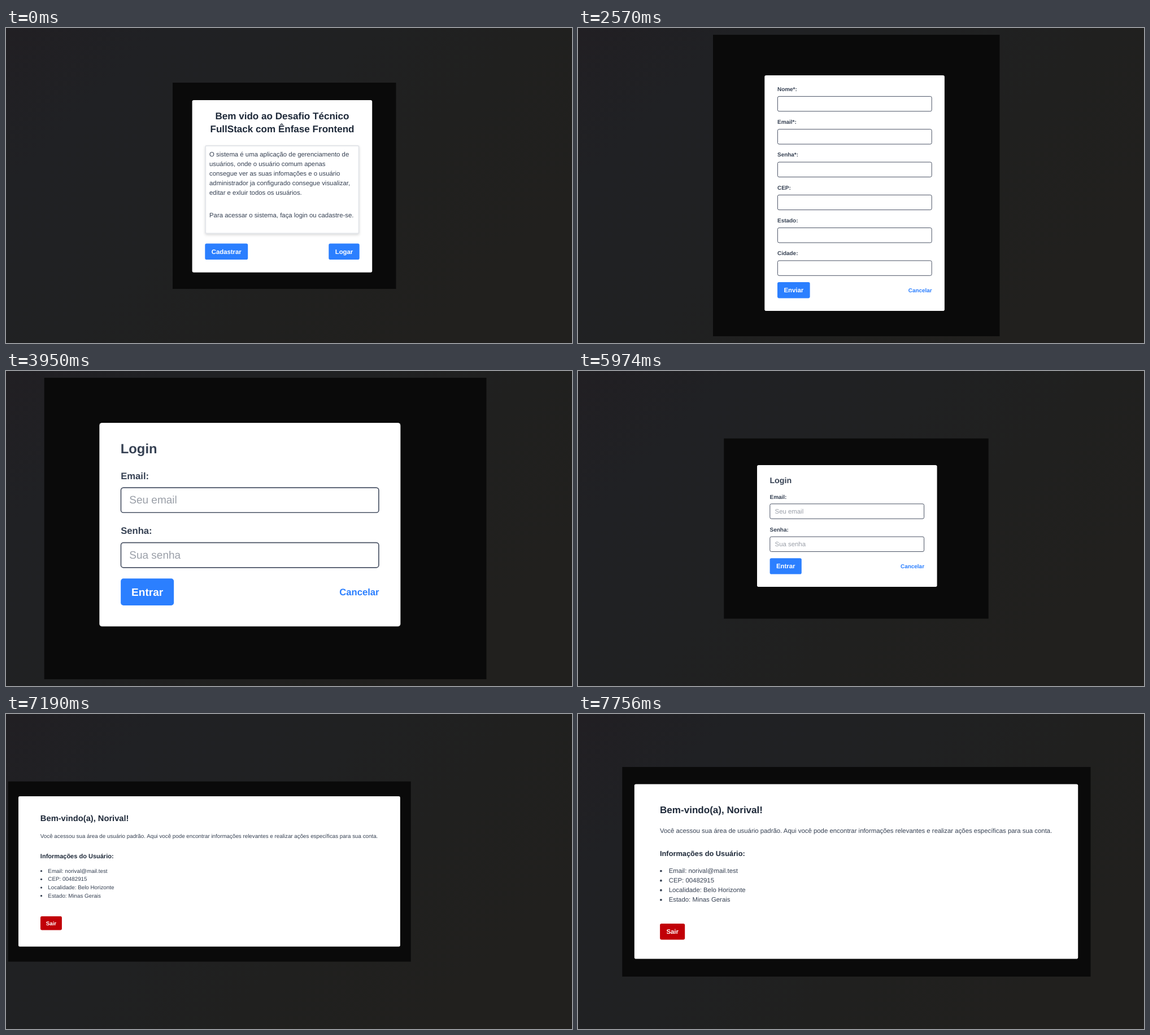
Recreate the animation shown at these times as an HTML page. Size 1002 by 559 pixels, loop 8 s.

```html
<!DOCTYPE html>
<html lang="pt-BR">
<head>
<meta charset="utf-8">
<title>Cadastro e login</title>
<style>
  html, body { margin: 0; width: 100%; height: 100%; overflow: hidden; background: #202021; }
  svg { display: block; width: 1002px; height: 559px; }
  text { font-family: "Liberation Sans", Arial, sans-serif; fill: #364153; text-rendering: geometricPrecision; white-space: pre; }
  .bold { font-weight: 700; }
  .dark { fill: #1e2939; }
  .link { fill: #2b7fff; }
  .hint { fill: #9a9fa8; }
  .light { fill: #fff; }
  .field { fill: #fff; stroke: #4a5365; }
  .panel { fill: #fff; stroke: #e4e6ea; stroke-width: 2; filter: drop-shadow(0 2px 2px rgba(0, 0, 0, .14)); }
</style>
</head>
<body>
<svg id="stage" viewBox="0 0 1002 559">
  <defs>
    <linearGradient id="wall" x1="0" y1="0" x2="1" y2=".55">
      <stop offset="0" stop-color="#211f23"/>
      <stop offset=".22" stop-color="#202124"/>
      <stop offset=".5" stop-color="#202122"/>
      <stop offset=".72" stop-color="#20201f"/>
      <stop offset="1" stop-color="#21201e"/>
    </linearGradient>
  </defs>
  <rect width="1002" height="559" fill="url(#wall)"/>
  <rect id="backdrop" fill="#0a0a0a"/>
</svg>
<script>
const stage = document.getElementById('stage');
const backdrop = document.getElementById('backdrop');

// Font sizes: 16, 14, 18, 20 and 24 px pages shown at 71 %
const ZOOM = 0.7113;
const BODY = 16 * ZOOM, SMALL = 14 * ZOOM, SUB = 18 * ZOOM, HEAD = 20 * ZOOM, TITLE = 24 * ZOOM;
const BLUE = '#2b7fff', RED = '#c10007';

function add(parent, tag, attrs, content) {
  const el = document.createElementNS('http://www.w3.org/2000/svg', tag);
  for (const key in attrs) el.setAttribute(key, attrs[key]);
  if (content) el.textContent = content;
  parent.appendChild(el);
  return el;
}

const box = (g, x, y, width, height, rx, attrs) =>
  add(g, 'rect', { x, y, width, height, rx, ...attrs });

const label = (g, x, y, size, content, cls = '', anchor = 'start') =>
  add(g, 'text', { x, y, 'font-size': size, class: cls, 'text-anchor': anchor }, content);

const field = (g, x, y) => box(g, x, y, 272.8, 26.4, 2.6, { class: 'field' });

function button(g, x, y, width, content, fill = BLUE) {
  box(g, x, y, width, 28.4, 2.8, { fill });
  label(g, x + width / 2, y + 18.1, BODY, content, 'bold light', 'middle');
}

function scene(x, y, width, height, draw) {
  const g = add(stage, 'g', { visibility: 'hidden' });
  box(g, x, y, width, height, 2.8, { fill: '#fff' });
  draw(g);
  return g;
}

const welcome = scene(329.6, 128, 318.6, 305.8, g => {
  label(g, 489, 162.4, TITLE, 'Bem vido ao Desafio Técnico', 'bold dark', 'middle');
  label(g, 489, 185.1, TITLE, 'FullStack com Ênfase Frontend', 'bold dark', 'middle');
  box(g, 353.2, 209, 271.4, 155.5, 2, { class: 'panel' });
  [
    'O sistema é uma aplicação de gerenciamento de',
    'usuários, onde o usuário comum apenas',
    'consegue ver as suas infomações e o usuário',
    'administrador ja configurado consegue visualizar,',
    'editar e exluir todos os usuários.'
  ].forEach((line, i) => label(g, 360, 227.7 + i * 17.07, BODY, line));
  label(g, 360, 335.5, BODY, 'Para acessar o sistema, faça login ou cadastre-se.');
  button(g, 352.3, 382.6, 75.9, 'Cadastrar');
  button(g, 571.3, 382.6, 54.4, 'Logar');
});

const signup = scene(330.3, 84, 318.6, 418, g => {
  ['Nome*:', 'Email*:', 'Senha*:', 'CEP:', 'Estado:', 'Cidade:'].forEach((name, i) => {
    const y = i * 58.3;
    label(g, 353, 111.6 + y, SMALL, name, 'bold');
    field(g, 353.4, 121.4 + y);
  });
  button(g, 353, 451, 57.6, 'Enviar');
  label(g, 626.7, 468.7, SMALL, 'Cancelar', 'bold link', 'end');
});

const login = scene(317, 167, 318.6, 216, g => {
  label(g, 339.4, 199.3, HEAD, 'Login', 'bold');
  [['Email:', 'Seu email'], ['Senha:', 'Sua senha']].forEach(([name, hint], i) => {
    const y = i * 58.3;
    label(g, 339.6, 226.5 + y, SMALL, name, 'bold');
    field(g, 339.8, 235.8 + y);
    label(g, 348.6, 252.7 + y, BODY, hint, 'hint');
  });
  button(g, 339.6, 332.2, 56.2, 'Entrar');
  label(g, 613, 349.9, SMALL, 'Cancelar', 'bold link', 'end');
});

const account = scene(99.8, 124.5, 785.4, 310, g => {
  label(g, 145, 175.8, TITLE, 'Bem-vindo(a), Norival!', 'bold dark');
  label(g, 145, 210.8, BODY, 'Você acessou sua área de usuário padrão. Aqui você pode encontrar informações relevantes e realizar ações específicas para sua conta.');
  label(g, 145, 252.4, SUB, 'Informações do Usuário:', 'bold dark');
  [
    'Email: norival@mail.test',
    'CEP: 00482915',
    'Localidade: Belo Horizonte',
    'Estado: Minas Gerais'
  ].forEach((line, i) => {
    const y = 282 + i * 17.07;
    add(g, 'circle', { cx: 146.9, cy: y - 3.4, r: 1.9, fill: '#364153' });
    label(g, 160.7, y, BODY, line);
  });
  button(g, 145.1, 372, 44.1, 'Sair', RED);
});

// start ms, scene, backdrop x, y, width, height, scene transform
const steps = [
  [0, welcome, 295, 97, 395.5, 366],
  [500, signup, 239, 12, 507.5, 535],
  [3950, login, 67.7, 12, 782.8, 535, 'translate(-365 -187.4) scale(1.673)'],
  [4150, login, 258.3, 119.7, 468.4, 319.8],
  [7190, account, 3.7, 119.7, 713, 319.8, 'translate(-63.9 38.9) scale(.8605)'],
  [7390, account, 78.3, 94, 829.2, 372]
];
const LOOP = 8000;
let shown;

function show(step) {
  if (step === shown) return;
  if (shown) shown[1].setAttribute('visibility', 'hidden');
  const [, g, x, y, width, height, transform = 'scale(1)'] = step;
  Object.entries({ x, y, width, height }).forEach(([k, v]) => backdrop.setAttribute(k, v));
  g.setAttribute('transform', transform);
  g.setAttribute('visibility', 'visible');
  shown = step;
}

const begin = performance.now();
function tick() {
  const t = (performance.now() - begin) % LOOP;
  show(steps.findLast(step => step[0] <= t));
  requestAnimationFrame(tick);
}
tick();
</script>
</body>
</html>
```
